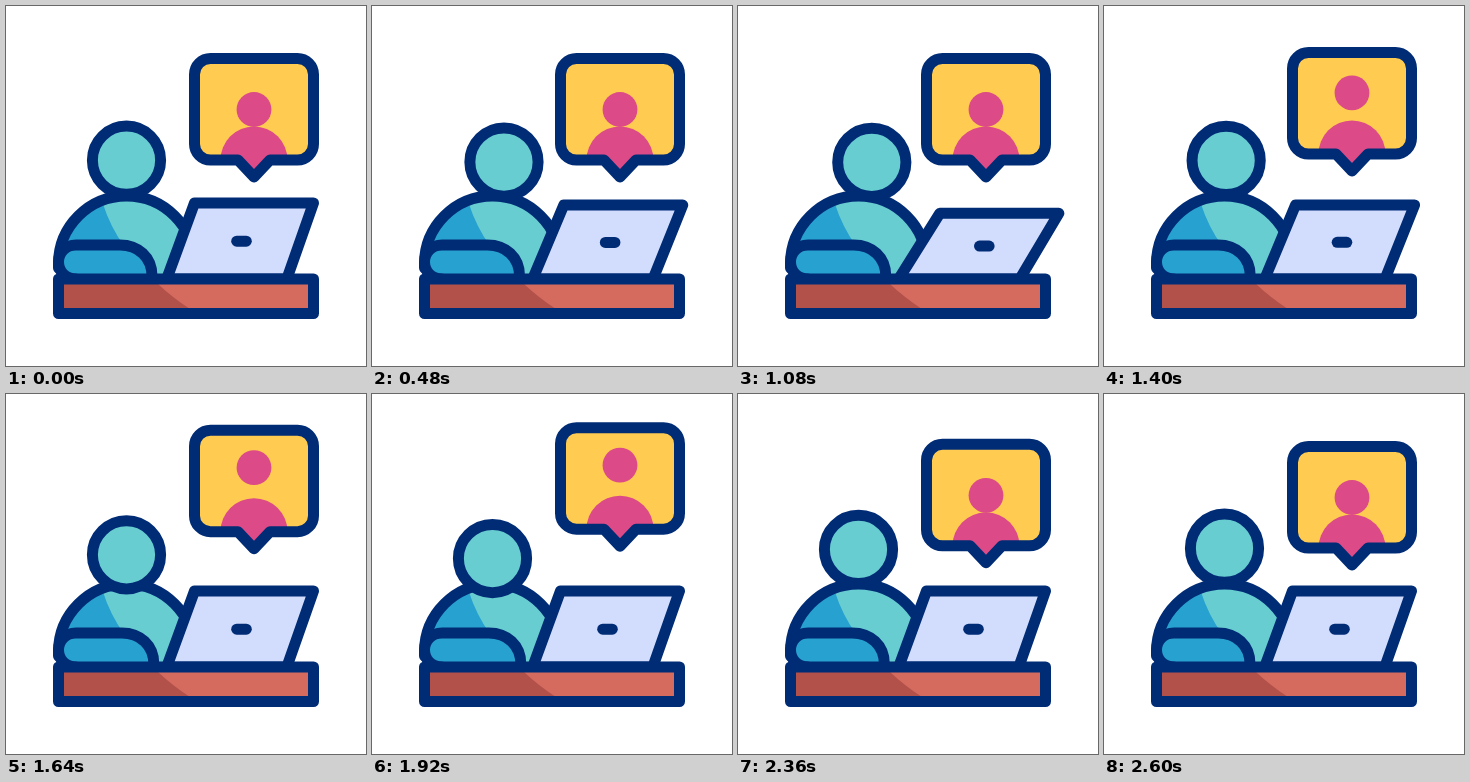
These frames come from a looping animation (360x360 px, 2720 ms). An HTML page:

```html
<!DOCTYPE html>
<html lang="en">
<head>
<meta charset="utf-8">
<title>Video call</title>
<style>
  html, body { margin: 0; width: 100%; height: 100%; overflow: hidden; background: #fff; }
  svg { display: block; width: 100%; height: 100%; }
  .line { fill: none; stroke: #002c76; stroke-width: 11; stroke-linecap: round; stroke-linejoin: round; }
  .teal { fill: #68cdd1; }
  .blue { fill: #27a1d0; }
  .pink { fill: #dc4a87; }
</style>
</head>
<body>
<svg viewBox="0 0 360 360">
  <defs>
    <clipPath id="torsoClip"><path d="M52.5 273V258A68 68 0 0 1 188.5 258V273Z"/></clipPath>
    <clipPath id="bubbleClip"><use href="#bubbleShape"/></clipPath>
    <path id="bubbleShape" d="M204.5 52.5H291.5A16 16 0 0 1 307.5 68.5V138A16 16 0 0 1 291.5 154H264L248 171L232 154H204.5A16 16 0 0 1 188.5 138V68.5A16 16 0 0 1 204.5 52.5Z"/>
  </defs>

  <g clip-path="url(#torsoClip)">
    <rect class="teal" x="47" y="185" width="150" height="90"/>
    <path class="blue" d="M40 180H91L97 198Q104 220 118 240L152 278H40Z"/>
  </g>
  <path class="line" d="M52.5 262V258A68 68 0 0 1 188.5 258"/>
  <path class="line" id="arm" style="fill:#27a1d0"/>
  <circle class="line" id="head" cx="120.5" cy="154.2" r="34.1" style="fill:#68cdd1"/>

  <path class="line" id="lid" style="fill:#d2dcfd"/>
  <path class="line" id="pill" d="M230.7 235.2H240.3"/>

  <rect x="52.5" y="273" width="255" height="34.5" fill="#d56b5f"/>
  <path d="M52.5 273H146L152 278Q167 292 184 303L190 307.5H52.5Z" fill="#b2514a"/>
  <rect class="line" x="52.5" y="273" width="255" height="34.5"/>

  <g id="bubble">
    <use href="#bubbleShape" fill="#ffcb50"/>
    <g clip-path="url(#bubbleClip)">
      <path class="pink" d="M214.5 154A33.5 33.5 0 0 1 281.5 154V175H214.5Z"/>
    </g>
    <circle class="pink" id="face" cx="248" cy="103.5" r="17.4"/>
    <use class="line" href="#bubbleShape"/>
  </g>
</svg>
<script>
  const LOOP = 2720, STEP = 40;
  const [head, lid, pill, bubble, face, arm] =
    ['head', 'lid', 'pill', 'bubble', 'face', 'arm'].map(id => document.getElementById(id));

  const ease = (t, from, to) => {
    const p = Math.min(1, Math.max(0, (t - from) / (to - from)));
    return p * p * (3 - 2 * p);
  };
  // Eases 0 to 1 between a and b, then back to 0 between c and d.
  const swing = (t, a, b, c, d) => ease(t, a, b) - ease(t, c, d);
  const move = (node, x, y) => node.setAttribute('transform', `translate(${x} ${y})`);

  function draw(t) {
    const lean = swing(t, 120, 600, 1040, 1500);
    const tilt = swing(t, 340, 780, 1040, 1560);
    const nod = swing(t, 1400, 1820, 1820, 2500);
    const rise = swing(t, 1160, 1820, 1820, 2500);
    const hop = swing(t, 1160, 1500, 1920, 2340);

    move(head, 13.6 * lean, 2.2 * lean + 11 * nod);

    const x = 13.6 * tilt, y = 197 + 8 * tilt + 2.5 * tilt * tilt;
    lid.setAttribute('d',
      `M160.7 273L${188.5 + x} ${y}H${307.5 + x}L${280.8 + tilt} 273Z`);
    move(pill, 11 * tilt, 5 * tilt);

    const reach = 1.8 * lean + 3 * nod;
    arm.setAttribute('d',
      `M${146 + reach} 270C${146 + reach} 251 ${132 + reach} 239 ${114 + reach} 239` +
      'H70C59 239 52.5 247 52.5 256C52.5 265 59 273 70 273');

    move(bubble, 0, -20 * rise);
    move(face, 0, -13.5 * hop);
  }

  const start = performance.now();
  function tick() {
    const t = (performance.now() - start) % LOOP;
    draw(Math.floor(t / STEP) * STEP);
    requestAnimationFrame(tick);
  }
  tick();
</script>
</body>
</html>
```
